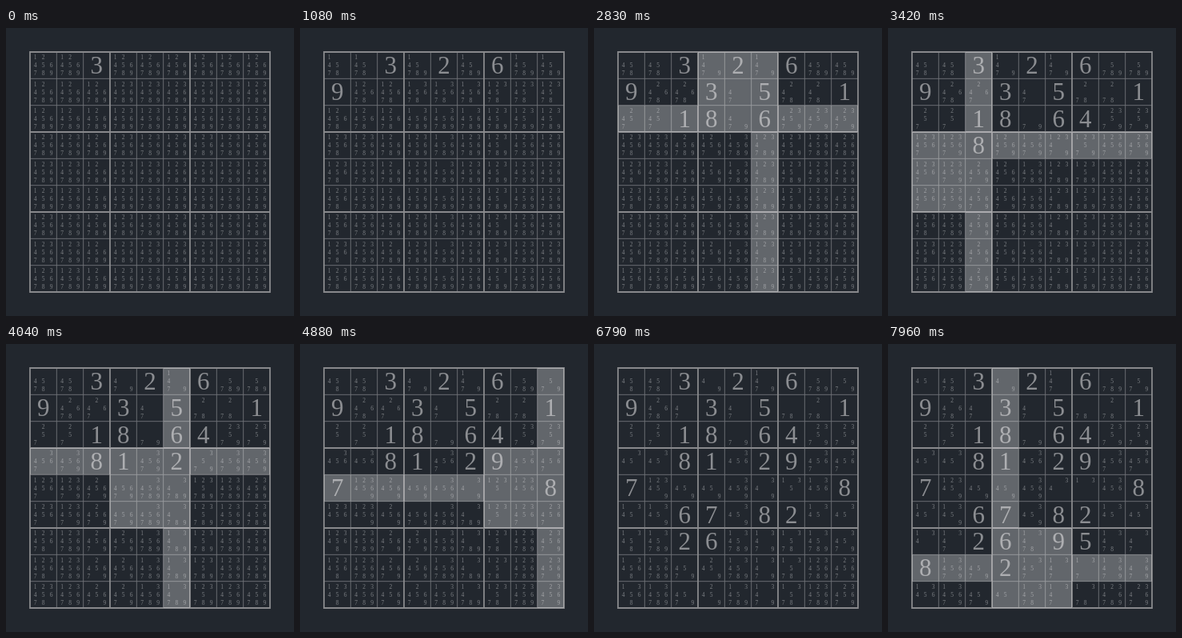
Write an HTML page with a canvas that moves like this. It is 360 px wide and 360 px high and loops after 8000 ms.

```html
<!DOCTYPE html>
<html lang="en">
<head>
<meta charset="utf-8">
<title>Sudoku candidates</title>
<style>
  html, body { margin: 0; width: 100%; height: 100%; overflow: hidden; background: #22272e; }
  canvas { display: block; width: 360px; height: 360px; }
</style>
</head>
<body>
<canvas id="stage"></canvas>
<script>
const SIZE = 360, EDGE = 30, CELL = 100 / 3;
const LOOP = 8000, STEP = 300, START_PHASE = 0.06;
const FONT = '"Liberation Serif", "Noto Serif", serif';
const PUZZLE = [
  '003020600', '900305001', '001806400',
  '008102900', '700000008', '006708200',
  '002609500', '800203009', '005010300'
].join('');

// Opacity of the white highlight over one step: [phase, alpha]
const GLOW = [[0.08, 0], [0.3, 0.29], [0.6, 0.29], [0.65, 0]];

const canvas = document.getElementById('stage');
const ctx = canvas.getContext('2d');
const scale = window.devicePixelRatio || 1;
canvas.width = canvas.height = SIZE * scale;

const cells = [...PUZZLE].map((char, i) => {
  const row = Math.floor(i / 9), col = i % 9;
  return {
    row, col, digit: +char,
    box: Math.floor(row / 3) * 3 + Math.floor(col / 3),
    x: EDGE + col * CELL, y: EDGE + row * CELL
  };
});
const givens = cells.filter(cell => cell.digit);

const sees = (a, b) => a.row === b.row || a.col === b.col || a.box === b.box;

function glowAt(phase) {
  for (let i = 1; i < GLOW.length; i++) {
    const [p0, a0] = GLOW[i - 1], [p1, a1] = GLOW[i];
    if (phase >= p0 && phase < p1) {
      const u = (phase - p0) / (p1 - p0);
      return a0 + (a1 - a0) * u * u * (3 - 2 * u);
    }
  }
  return 0;
}

function drawDigit(digit, x, y, size, color) {
  ctx.font = `${size}px ${FONT}`;
  ctx.fillStyle = color;
  ctx.fillText(digit, x, y + size * 0.335);
}

function drawCell(cell, placed) {
  const cx = cell.x + CELL / 2, cy = cell.y + CELL / 2;
  if (placed.includes(cell)) {
    drawDigit(cell.digit, cx, cy, 31, '#8b8d91');
    return;
  }
  const taken = new Set(placed.filter(p => sees(p, cell)).map(p => p.digit));
  for (let n = 1; n <= 9; n++) {
    if (taken.has(n)) continue;
    const dx = (n - 1) % 3 - 1, dy = Math.floor((n - 1) / 3) - 1;
    drawDigit(n, cx + dx * 10, cy + dy * 10, 7.5, '#7d8085');
  }
}

function drawLines(thick) {
  ctx.strokeStyle = thick ? '#88898c' : '#707378';
  ctx.lineWidth = thick ? 1.8 : 0.9;
  ctx.lineCap = 'square';
  ctx.beginPath();
  for (let i = 0; i <= 9; i++) {
    if ((i % 3 === 0) !== thick) continue;
    const p = EDGE + i * CELL;
    ctx.moveTo(EDGE, p);
    ctx.lineTo(SIZE - EDGE, p);
    ctx.moveTo(p, EDGE);
    ctx.lineTo(p, SIZE - EDGE);
  }
  ctx.stroke();
}

function drawGlow(source, alpha) {
  ctx.fillStyle = `rgba(255, 255, 255, ${alpha})`;
  ctx.beginPath();
  for (const cell of cells) {
    if (sees(cell, source)) ctx.rect(cell.x, cell.y, CELL, CELL);
  }
  ctx.fill();
}

function draw(time) {
  const progress = START_PHASE + time / STEP;
  const index = Math.floor(progress);
  const placed = givens.slice(0, index + 1);

  ctx.setTransform(scale, 0, 0, scale, 0, 0);
  ctx.textAlign = 'center';
  ctx.fillStyle = '#22272e';
  ctx.fillRect(0, 0, SIZE, SIZE);
  drawLines(false);
  drawLines(true);
  cells.forEach(cell => drawCell(cell, placed));

  const alpha = glowAt(progress - index);
  if (alpha > 0) drawGlow(givens[index], alpha);
}

const origin = performance.now();
function tick() {
  draw((performance.now() - origin) % LOOP);
  requestAnimationFrame(tick);
}
tick();
</script>
</body>
</html>
```
